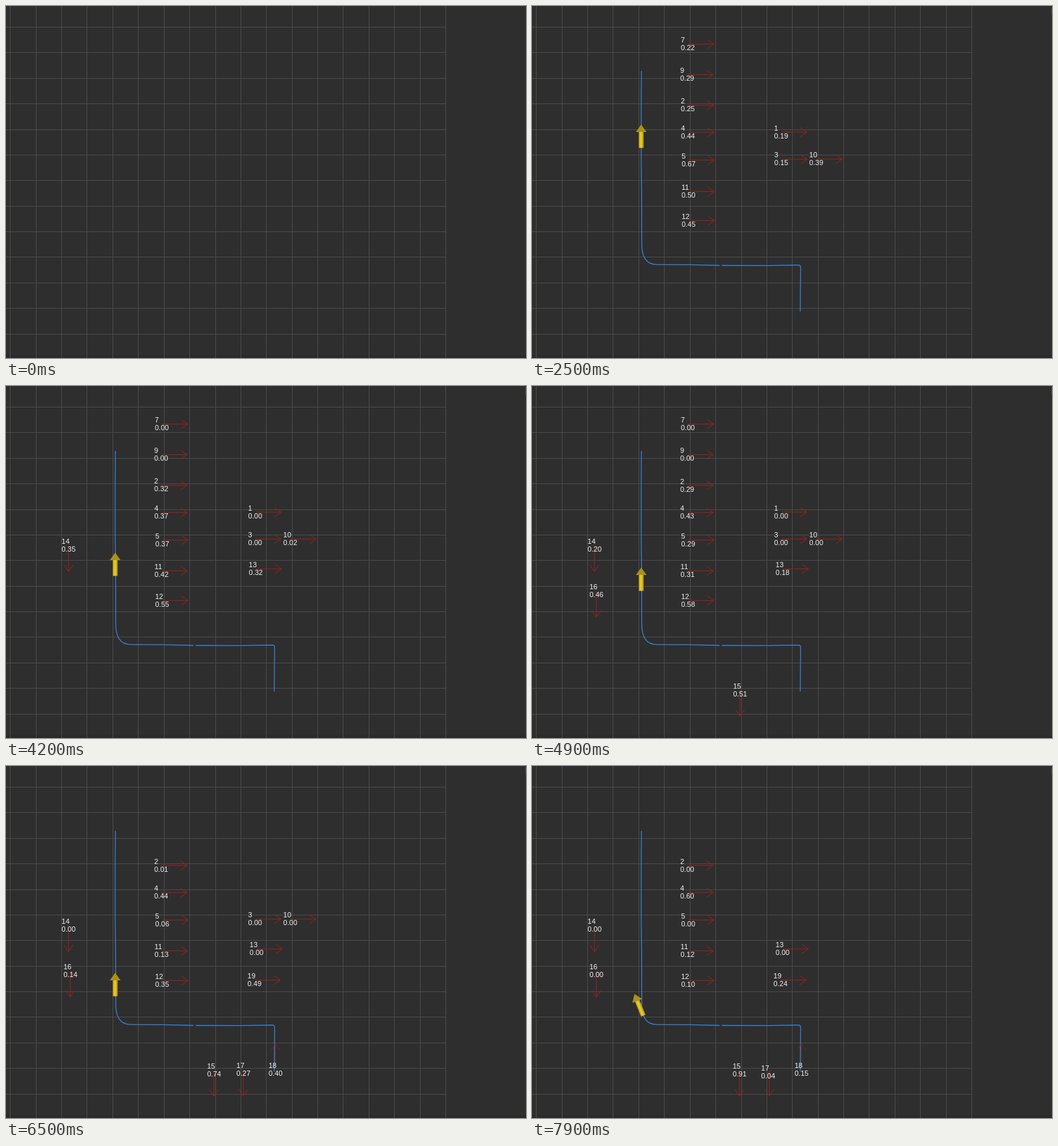
An HTML page with a canvas for the animation above (8000 ms loop, 800x542 px).

```html
<!DOCTYPE html>
<html lang="en">
<head>
<meta charset="utf-8">
<title>Track map</title>
<style>
html, body { margin: 0; width: 100%; height: 100%; overflow: hidden; background: #2e2e2e; }
canvas { display: block; }
</style>
</head>
<body>
<canvas id="stage" width="800" height="542"></canvas>
<script>
const ctx = document.getElementById('stage').getContext('2d');
const LOOP = 8000, STEP = 100, START = 500;
const KEYS = [1300, 2500, 3500, 4900, 6500, 7900];
const TURN = { right: 0, down: Math.PI / 2, up: -Math.PI / 2 };
const clamp = v => Math.max(0, Math.min(1, v));
const tracks = [];

// x, y: left edge and first baseline; values: one per key time from birth on
function track(id, x, y, born, values, options) {
  tracks.push({ id, x, y, born, values, dir: 'right', dies: LOOP, dx: 0, dy: 0,
    moves: 1400, span: 3000, color: '#a0211b', ...options });
}
track(7, 229, 56, START, [.43, .22], { dies: 6100 });
track(2, 229.6, 150, START, [.44, .25, .35, .29, .01], { dx: -1.6, dy: .5 });
track(4, 230, 191.5, START, [.55, .44, .31, .43, .44, .6], { dx: -2, dy: .6 });
track(5, 230.6, 234.5, START, [.6, .67, .45, .29, .06], { dx: -1 });
track(1, 372.6, 191.5, START, [.38, .19], { dies: 6200 });
track(3, 373, 233.5, START, [.32, .15], { dies: 7100, dx: -.5, dy: -.5 });
track(9, 228, 103, 1300, [.5, .29, .07], { dies: 6300 });
track(10, 426.6, 233, 2000, [.39, .17], { dies: 7200 });
track(12, 230.6, 327.6, 2200, [.45, .52, .58, .35, .1], { dx: -1.2 });
track(11, 230, 283, 2300, [.5, .53, .31, .13, .12], { dx: -1.4, dy: -1, moves: 2500, span: 1000 });
track(13, 371.6, 279, 3300, [.46, .18], { dx: 3.2, moves: 3600, span: 1000 });
track(14, 85.6, 243, 3400, [.5, .2], { dir: 'down' });
track(15, 309.5, 465.5, 4500, [.51, .74, .91], { dir: 'down', dx: -.8, moves: 6500, span: 1000 });
track(16, 88.5, 313, 4700, [.46, .14], { dir: 'down' });
track(17, 354.6, 465, 5300, [.27, .04],
  { dir: 'down', dx: -2, dy: 4.3, moves: 6700, span: 1000, pinned: true });
track(18, 404, 465, 6000, [.4, .15], { dir: 'up', color: '#7c211d' });
track(19, 371.6, 327, 6300, [.49, .24]);

function valueAt({ born, values }, t) {
  const first = KEYS.findIndex(k => k >= born);
  if (t < KEYS[first]) return values[0] + (KEYS[first] - t) * .0002;
  let i = first;
  while (i < KEYS.length - 1 && KEYS[i + 1] <= t) i++;
  const a = values[i - first] || 0, b = values[i - first + 1];
  if (b === undefined) return Math.max(0, a - (t - KEYS[i]) * .00021);
  return a + (b - a) * (t - KEYS[i]) / (KEYS[i + 1] - KEYS[i]);
}

// Smooth curve through the vehicle's position at the key times
const times = [START, ...KEYS], places = [100, 150.5, 218, 265, 315, 354, 384];
function vehicleY(t) {
  const n = times.length;
  let i = 0;
  while (i < n - 2 && times[i + 1] <= t) i++;
  const slope = k => {
    const a = Math.max(0, k - 1), b = Math.min(n - 1, k + 1);
    return (places[b] - places[a]) / (times[b] - times[a]);
  };
  const h = times[i + 1] - times[i], u = (t - times[i]) / h, w = 1 - u;
  return places[i] * w * w * (1 + 2 * u) + places[i + 1] * u * u * (3 - 2 * u)
    + h * u * w * (slope(i) * w - slope(i + 1) * u);
}

function drawGrid() {
  ctx.fillStyle = '#2e2e2e';
  ctx.fillRect(0, 0, 800, 542);
  ctx.fillStyle = '#2b2a2b';
  ctx.fillRect(0, 538, 800, 4);
  ctx.fillStyle = '#4c4c4c';
  for (let i = 0; i < 18; i++) ctx.fillRect(Math.round(6.3 + 39.4 * i), 0, 1, 542);
  for (let i = 0; i < 13; i++) ctx.fillRect(0, Math.round(31.9 + 39.4 * i), 677, 1);
}

const route = new Path2D(`M168.4 100 L168 150 L168 230 L168.6 285 L168.8 362
  C168 386 175 398 193 398.2 L242 398.4 L288.5 399.5
  M292 399.5 L362 399.6 L410 399 Q413.5 399 413.3 403 L412.6 470.5`);
const head = new Path2D('M0 -35.5 L8.2 -24 L-8.2 -24 Z');

function drawVehicle(t) {
  const s = clamp((t - 6900) / 1000), turn = s * s * (3 - 2 * s);
  ctx.save();
  ctx.translate(168 + 3 * turn, vehicleY(t));
  ctx.rotate(-22 * Math.PI / 180 * turn);
  const shade = ctx.createLinearGradient(-3.7, 0, 3.7, 0);
  shade.addColorStop(0, '#b89d1c');
  shade.addColorStop(.45, '#f0d024');
  shade.addColorStop(1, '#b0951a');
  ctx.fillStyle = shade;
  ctx.fillRect(-3.7, -25, 7.4, 25.5);
  ctx.fillStyle = '#a8911c';
  ctx.fill(head);
  ctx.restore();
}

function drawTrack(tr, t) {
  const move = clamp((t - tr.moves) / tr.span);
  const x = tr.x + tr.dx * move, y = tr.y + tr.dy * move;
  if (t >= tr.born + 200) {
    ctx.save();
    ctx.translate((tr.pinned ? tr.x : x) + 10.5, (tr.pinned ? tr.y : y) + 2.7);
    ctx.rotate(TURN[tr.dir]);
    ctx.strokeStyle = tr.color;
    ctx.lineWidth = 1;
    ctx.beginPath();
    ctx.moveTo(1, 0);
    ctx.lineTo(40, 0);
    ctx.moveTo(30, -7);
    ctx.lineTo(40, 0);
    ctx.lineTo(30, 7);
    ctx.stroke();
    ctx.restore();
  }
  ctx.fillStyle = '#f2f2f2';
  ctx.fillText(tr.id, x, y);
  ctx.fillText(valueAt(tr, t).toFixed(2), x, y + 12);
}

function draw(t) {
  drawGrid();
  if (t >= 300) {
    ctx.fillStyle = '#484848';
    ctx.fillRect(799, 3, 1, 11);
  }
  if (t < START) return;
  ctx.strokeStyle = '#3a80d2';
  ctx.lineWidth = 1.3;
  ctx.stroke(route);
  drawVehicle(t);
  ctx.font = '11px "Liberation Sans", Arial, sans-serif';
  for (const tr of tracks) if (t >= tr.born && t < tr.dies) drawTrack(tr, t);
}

const begin = performance.now();
function tick() {
  const t = (performance.now() - begin) % LOOP;
  draw(Math.floor(t / STEP) * STEP);
  requestAnimationFrame(tick);
}
tick();
</script>
</body>
</html>
```
